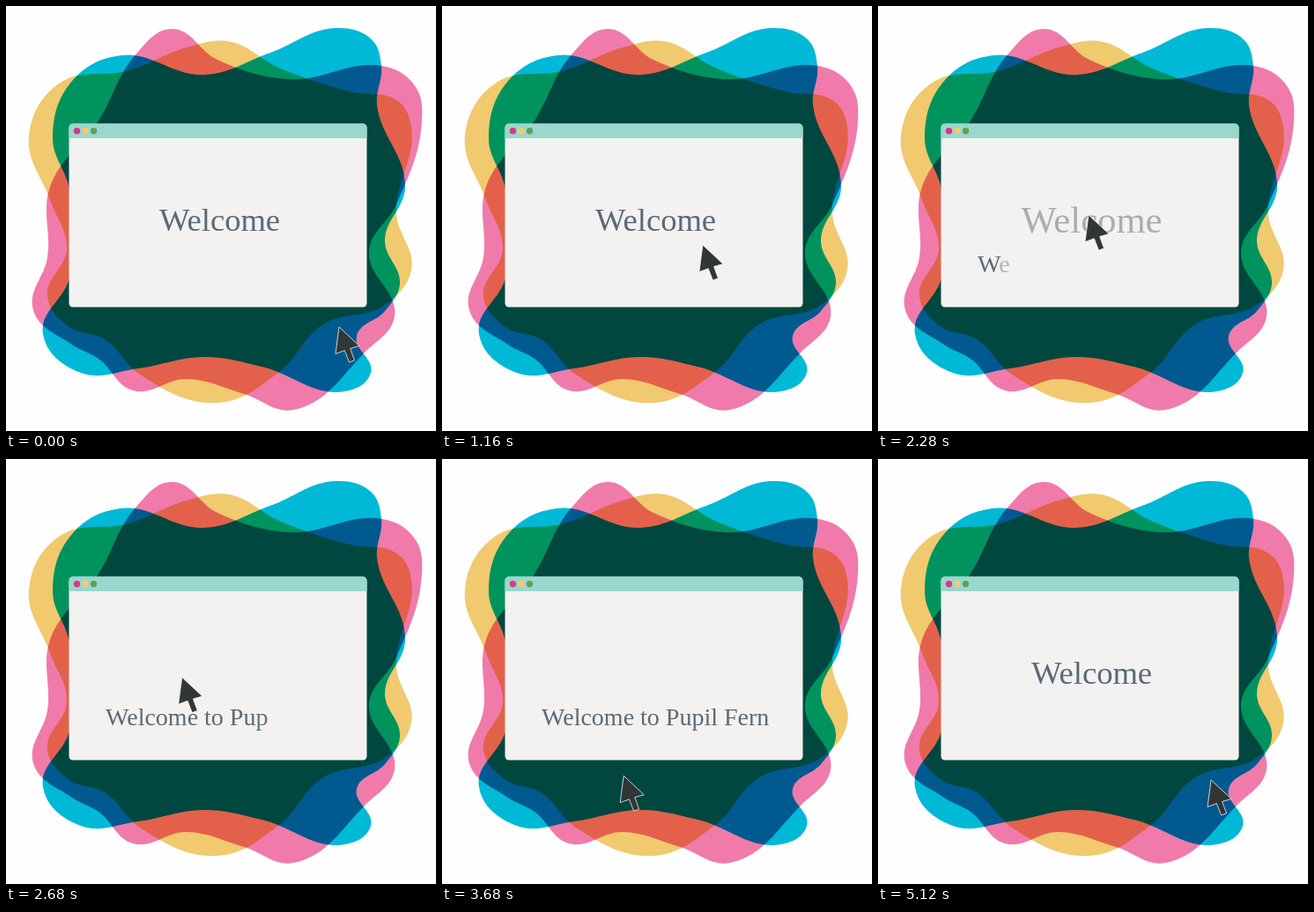
An HTML page that plays this animation: 488 by 482 pixels, repeating every 5.24 s.

```html
<!DOCTYPE html>
<html lang="en">
<head>
<meta charset="utf-8">
<title>Welcome window</title>
<style>
  html, body { margin: 0; width: 100%; height: 100%; overflow: hidden; background: #fefefe; }
  svg { display: block; width: 488px; height: 482px; }
  .blob { mix-blend-mode: multiply; }
  text { font-family: "Liberation Serif", "Times New Roman", serif; fill: #5a6a76; white-space: pre; }
</style>
</head>
<body>
<svg viewBox="0 0 488 482">
  <rect width="488" height="482" fill="#fefefe"/>
  <g id="blobs"></g>
  <rect x="71.5" y="133.5" width="338" height="208" rx="4.5" fill="#f3f2f1"/>
  <path d="M71.5 150V138a4.5 4.5 0 0 1 4.5-4.5h329a4.5 4.5 0 0 1 4.5 4.5v12z" fill="#9ad7cd"/>
  <g id="dots"></g>
  <text id="title" y="12.2" font-size="36.6" text-anchor="middle">Welcome</text>
  <text id="line" x="113" y="302" font-size="28"></text>
  <path id="cursor" d="M0 0L-4 30.5 6.3 26.7 11.5 40 17.5 37.8 12.6 24.5 23 21.5z"
        fill="#303735" stroke="#f3f2f1" stroke-width=".8"/>
</svg>
<script>
const LOOP = 5240;
const PINK = '#f17bab', YELLOW = '#f2ca6f', CYAN = '#00bad8';
const $ = id => document.getElementById(id);

function add(parent, tag, attrs = {}) {
  const el = document.createElementNS('http://www.w3.org/2000/svg', tag);
  for (const key in attrs) el.setAttribute(key, attrs[key]);
  return parent.appendChild(el);
}

// Closed curve whose tangent at each point bisects its two neighbouring segments.
function smooth(points) {
  const p = points.split(' ').map(s => s.split(',').map(Number));
  const at = i => p[(i + p.length) % p.length];
  const span = i => {
    const [x, y] = at(i), [u, v] = at(i + 1), len = Math.hypot(u - x, v - y);
    return { len, x: (u - x) / len, y: (v - y) / len };
  };
  const handle = (i, reach) => {
    const a = span(i - 1), b = span(i), [x, y] = at(i);
    const k = 0.37 * reach / Math.hypot(a.x + b.x, a.y + b.y);
    return [x + (a.x + b.x) * k, y + (a.y + b.y) * k];
  };
  const curves = p.map((_, i) => {
    const { len } = span(i);
    return `C${handle(i, len)} ${handle(i + 1, -len)} ${at(i + 1)}`;
  });
  return `M${p[0]}${curves.join('')}z`;
}

const blob = (fill, points) => add($('blobs'), 'path', { class: 'blob', fill, d: smooth(points) });

blob(YELLOW, '252,40 312,71 390,97 445,108 460,137 443,235 460,299 430,339 360,361 310,415 ' +
  '240,450 152,418 112,378 72,364 47,330 69,275 50,220 26,148 60,88 140,73 205,47');
blob(PINK, '188,26 240,61 320,83 432,69 465,92 472,130 443,225 412,278 441,352 408,392 ' +
  '326,458 270,440 205,423 144,436 105,400 75,384 31,345 47,285 50,205 105,130 148,54');
blob(CYAN, '375,25 415,38 426,68 421,112 453,205 430,266 447,315 430,346 398,374 414,416 385,437 ' +
  '290,409 225,398 150,411 85,416 42,372 72,308 72,208 53,150 75,85 130,56 225,78 300,53');

['#d8388a', YELLOW, '#5aa35c'].forEach((fill, i) =>
  add($('dots'), 'circle', { cx: 80.5 + 9.5 * i, cy: 141.8, r: 3.7, fill }));

const letters = [...'Welcome to Pupil Fern'].map(ch => {
  const span = add($('line'), 'tspan');
  span.textContent = ch;
  return span;
});

const clamp = x => Math.min(1, Math.max(0, x));
const part = (t, from, to) => clamp((t - from) / (to - from));
const ease = x => x * x * (3 - 2 * x);
const mix = (a, b, u) => a.map((v, k) => v + (b[k] - v) * u);

// Point on a Bezier curve of any degree.
function along(path, u) {
  while (path.length > 1) path = path.slice(1).map((b, i) => mix(path[i], b, u));
  return path[0];
}

const HOME = [378, 364], TITLE = [239, 237];

function drawCursor(t) {
  const tip = t < 2280
    ? along([HOME, [308, 263], TITLE], ease(part(t, 400, 1760)))
    : along([TITLE, [99, 263], [49, 387], HOME], ease(part(t, 2280, 4320)));
  $('cursor').setAttribute('transform', `translate(${tip})`);
}

function drawTitle(t) {
  const leave = part(t, 2120, 2440), enter = part(t, 4573, 5100);
  const gone = leave === 1;
  const scale = gone ? 0.81 + 0.19 * enter : 1 + 0.33 * leave;
  $('title').setAttribute('transform', `translate(242.5 242.3) scale(${scale})`);
  $('title').setAttribute('opacity', gone ? enter : 1 - leave);
}

function drawLine(t) {
  const typed = (t - 2235) / 32;
  const left = letters.length - Math.max(0, (t - 4562) / 20.5);
  letters.forEach((el, i) => el.setAttribute('fill-opacity', clamp(Math.min(typed, left) - i)));
}

const start = performance.now();
function tick() {
  const t = (performance.now() - start) % LOOP;
  drawCursor(t);
  drawTitle(t);
  drawLine(t);
  requestAnimationFrame(tick);
}
tick();
</script>
</body>
</html>
```
